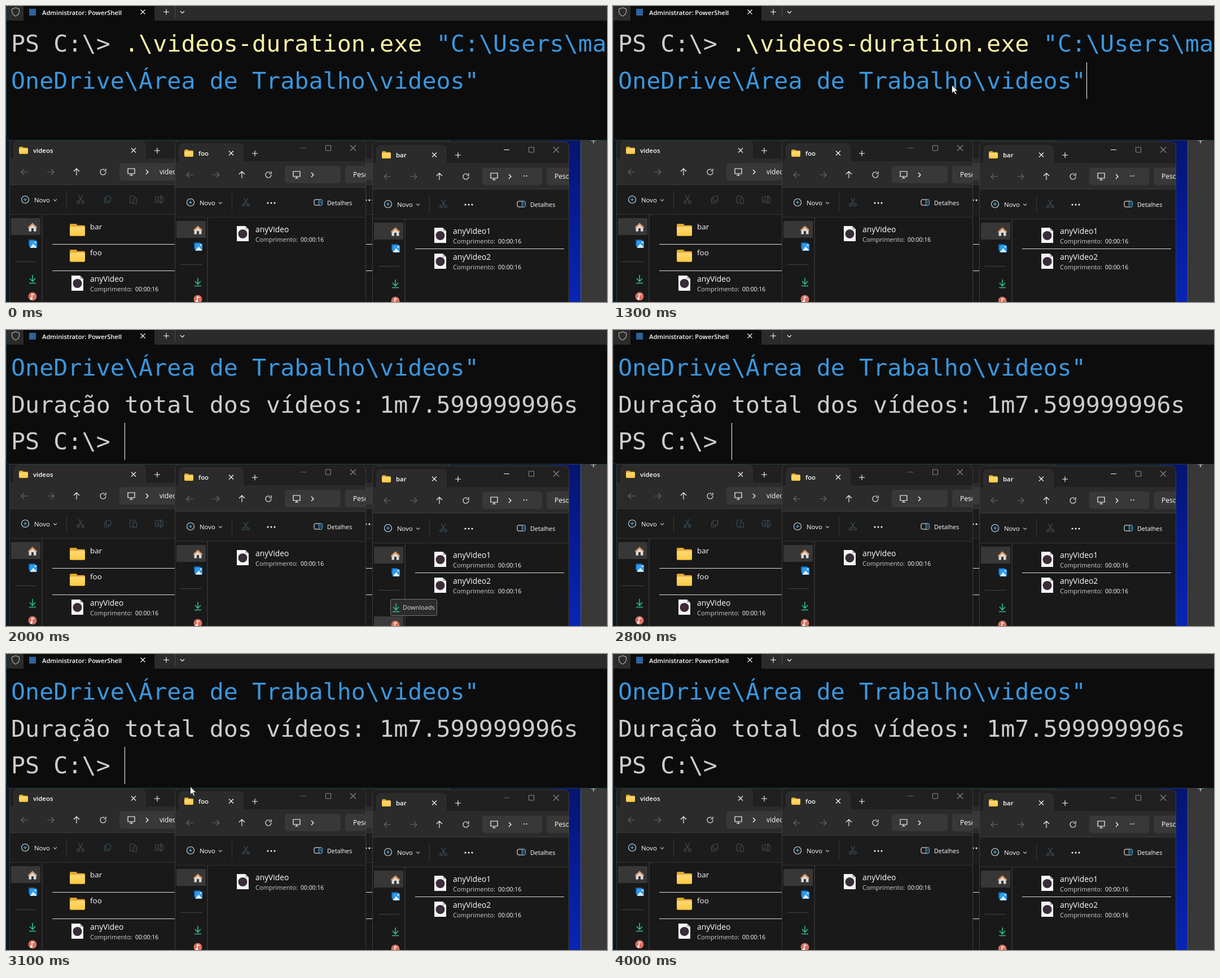
These frames come from a looping animation (1065 px wide and 526 px high, 4200 ms). An HTML page with a canvas:

```html
<!DOCTYPE html>
<html lang="pt">
<head>
<meta charset="utf-8">
<style>
html, body { margin: 0; width: 100%; height: 100%; overflow: hidden; background: #0c0c0c; }
canvas { display: block; }
</style>
</head>
<body>
<canvas id="stage" width="1065" height="526"></canvas>
<script>
const ctx = document.getElementById('stage').getContext('2d');
const LOOP = 4200;
const MONO = '"DejaVu Sans Mono", monospace';
const SANS = '"Open Sans", "Noto Sans", sans-serif';
const CELL = 25.12, ROW = 65.6;
const GREY = '#cccccc', YELLOW = '#f9f1a5', BLUE = '#3a96dd';
const WHITE = '#ffffff', DIM = '#6a6a6a', FADED = '#3f5563';

function rect(x, y, w, h, color) {
  ctx.fillStyle = color;
  ctx.fillRect(x, y, w, h);
}

function round(x, y, w, h, r, fill, stroke) {
  ctx.beginPath();
  ctx.roundRect(x, y, w, h, r);
  if (fill) { ctx.fillStyle = fill; ctx.fill(); }
  if (stroke) { ctx.strokeStyle = stroke; ctx.lineWidth = 1; ctx.stroke(); }
}

function disc(x, y, r, color) {
  ctx.beginPath();
  ctx.arc(x, y, r, 0, 7);
  ctx.fillStyle = color;
  ctx.fill();
}

function ring(x, y, r, color, from = 0, to = 7) {
  ctx.beginPath();
  ctx.arc(x, y, r, from, to);
  ctx.strokeStyle = color;
  ctx.lineWidth = 1.1;
  ctx.stroke();
}

function path(d, x, y, color, width = 1.1) {
  ctx.save();
  ctx.translate(x, y);
  const p = new Path2D(d);
  if (width) {
    ctx.strokeStyle = color;
    ctx.lineWidth = width;
    ctx.stroke(p);
  } else {
    ctx.fillStyle = color;
    ctx.fill(p);
  }
  ctx.restore();
}

function text(s, x, y, size, color = WHITE, weight = 400, family = SANS) {
  ctx.font = `${weight} ${size}px ${family}`;
  ctx.fillStyle = color;
  ctx.fillText(s, x, y);
}

const cross = (x, y, color, r = 4) => path(`M${-r} ${-r}L${r} ${r}M${r} ${-r}L${-r} ${r}`, x, y, color);
const plus = (x, y, color, r = 5) => path(`M${-r} 0H${r}M0 ${-r}V${r}`, x, y, color);
const chevDown = (x, y, color, r = 3) => path(`M${-r} ${-r / 2}L0 ${r / 2}L${r} ${-r / 2}`, x, y, color);
const chevRight = (x, y) => path('M-2 -4L2 0L-2 4', x, y, WHITE, 1.3);

function dots(x, y) {
  for (let i = -1; i < 2; i++) disc(x + i * 6, y, 1.5, WHITE);
}

function folder(x, y, w) {
  const h = w * 0.8;
  round(x, y, w * 0.48, h * 0.5, 2, '#e2a52b');
  round(x, y + h * 0.13, w, h * 0.87, 2, '#e9ad35');
  const g = ctx.createLinearGradient(0, y, 0, y + h);
  g.addColorStop(0, '#ffe08a');
  g.addColorStop(1, '#fcc93f');
  round(x, y + h * 0.26, w, h * 0.74, 2, g);
}

function videoFile(x, y, name) {
  path('M0 0H15L21 6V27H0Z', x, y, '#f6f6f6', 0);
  path('M15 0V6H21Z', x, y, '#bdbdbd', 0);
  disc(x + 10.5, y + 14, 8, '#3a2c38');
  text(name, x + 33, y + 11, 13.8);
  text('Comprimento:', x + 33, y + 28, 11.1, '#cfcfcf');
  text('00:00:16', x + 113, y + 28, 10.4);
}

function download(x, y) {
  path('M0 -7V4M-5 -1L0 4.5L5 -1M-6 7.5H6', x, y, '#2fbf95', 1.6);
}

function sidebar(hover) {
  rect(57, 138, 2, 200, '#2f2f2f');
  rect(3, 144, 52, 30, '#373737');
  path('M-8 0L0 -7.5L8 0L6.5 1.5V7.5H2V2H-2V7.5H-6.5V1.5Z', 41, 160, '#d9d9d9', 0);
  path('M-8 0L0 -7.5L8 0L6.5 1.5L0 -4.5L-6.5 1.5Z', 41, 160, '#e08a4b', 0);
  round(34, 182, 12, 12, 2, '#1266b4');
  round(36, 184, 13, 13, 2, '#2f9bea');
  path('M-6 6L0 -1L6 6Z', 42.5, 190.5, '#e6f4ff', 0);
  disc(46, 187, 1.3, WHITE);
  rect(10, 221, 38, 1, '#444');
  download(41, 252);
  if (hover) rect(3, 268, 52, 24, '#3b3b3b');
  disc(41, 283, 7.5, '#d9705f');
  path('M-1 4V-4L3 -3', 41, 283, '#fff', 1.5);
  disc(38.8, 287, 2, '#fff');
}

function scissors(x, y) {
  path('M-4 -7L3 4M4 -7L-3 4', x, y, FADED);
  ring(x - 4, y + 5.5, 2.2, FADED);
  ring(x + 4, y + 5.5, 2.2, FADED);
}

// Window chrome shared by the three file explorers, in local coordinates.
function explorer(o, body) {
  ctx.save();
  ctx.translate(o.x, o.y);
  ctx.beginPath();
  ctx.roundRect(0, 0, o.w, 320, 8);
  ctx.clip();
  rect(0, 0, o.w, 320, '#191919');
  rect(0, 0, o.w, 40, '#202020');
  round(8, 7, o.tab - 8, 40, 7, '#2b2b2b', '#343434');
  rect(0, 38, o.w, 46, '#2b2b2b');
  rect(0, 84, o.w, 54, '#1c1c1c');
  rect(0, 84, o.w, 1, '#393939');
  rect(0, 137, o.w, 1, '#343434');

  folder(17, 17, 16);
  text(o.title, 42, 28, 11.4, WHITE, 600);
  cross(o.tab - 21, 23.5, WHITE);
  plus(o.tab + 21, 24, WHITE);
  const c = o.w - 67;
  path('M-5 0H5', c - 44, 14.5, o.active ? WHITE : DIM);
  path('M-4.5 -4.5H4.5V4.5H-4.5Z', c, 14.5, '#8a8a8a', 1);
  cross(c + 44, 14.5, '#8a8a8a', 5);

  path('M-6 0H6M-1 -5L-6 0L-1 5', 27, 62, DIM);
  path('M-6 0H6M1 -5L6 0L1 5', 73, 62, DIM);
  path('M0 6V-6M-5 -1L0 -6L5 -1', 119, 62, WHITE);
  ring(166, 62, 5, WHITE, 0, 5.3);
  path('M5 -6V-2H1', 166, 62, WHITE);
  round(195, 46, o.bar, 31, 5, '#383838');
  path('M-6 -5H6V4H-6ZM-3 7H3M0 4V7', 216, 61, WHITE, 1.2);
  chevRight(244, 62);
  round(203 + o.bar, 46, 200, 31, 5, '#383838');
  text('Pesquisar', 217 + o.bar, 66, 12);

  ring(28, 111, 6.5, '#cfe6f5');
  plus(28, 111, '#4cc2ff', 3);
  text('Novo', 44, 116, 11.4);
  chevDown(81, 112, '#bbb');
  rect(101, 95, 1, 32, '#383838');
  scissors(126, 110);
  if (o.details) {
    dots(171, 112);
    const d = o.w - 85;
    round(d - 7, 106, 14, 10, 2, null, WHITE);
    round(d + 1.5, 106, 6, 10, 2, '#1c1c1c', '#4cc2ff');
    path('M3 3H6M3 6H6', d, 106, '#4cc2ff', 1);
    text('Detalhes', d + 16, 115.5, 10.8);
  }
  sidebar(o.hover);
  ctx.translate(-o.x, -o.y);
  body();
  ctx.restore();
  round(o.x + 0.5, o.y + 0.5, o.w - 1, 320, 8, null, '#3c3c3c');
}

function videosWindow() {
  explorer({ x: 6, y: 233, w: 780, tab: 241, bar: 350, title: 'videos' }, () => {
    text('videos', 272, 299, 12);
    round(174.5, 341, 8, 9, 1, null, FADED);
    round(177.5, 338, 8, 9, 1, '#1c1c1c', FADED);
    round(219.5, 338, 9, 12, 1, null, FADED);
    round(225.5, 342, 6, 9, 1, '#1c1c1c', FADED);
    round(264.5, 339, 14, 10, 2, null, FADED);
    text('A', 267, 348, 9, FADED);
    rect(274, 336, 1, 16, FADED);
    dots(644, 345);
    folder(113, 387, 27);
    text('bar', 149, 397, 13.5);
    rect(82, 423, 568, 1, '#e0e0e0');
    folder(113, 433, 27);
    text('foo', 149, 443, 13.5);
    rect(82, 470, 568, 1, '#e0e0e0');
    videoFile(116, 479, 'anyVideo');
  });
}

function fooWindow() {
  explorer({ x: 299, y: 238, w: 339, tab: 121, bar: 99, title: 'foo', details: true },
    () => videoFile(409, 391, 'anyVideo'));
}

function barWindow(t) {
  const hover = t >= 2000 && t < 2200;
  explorer({ x: 649, y: 241, w: 349, tab: 131, bar: 106, title: 'bar', details: true, active: t < 3000, hover }, () => {
    disc(918, 302, 1.1, WHITE);
    disc(922.5, 302, 1.1, WHITE);
    videoFile(759, 394, 'anyVideo1');
    rect(725, 431, 264, 1, '#e0e0e0');
    videoFile(759, 440, 'anyVideo2');
  });
  if (hover) {
    round(681.5, 478.5, 82, 29, 3, '#2c2c2c', '#777');
    download(691, 493);
    text('Downloads', 703, 497, 10.9, '#dcdcdc');
  }
}

function desktop() {
  rect(0, 230, 1065, 296, '#0a1824');
  const g = ctx.createLinearGradient(0, 239, 0, 526);
  g.addColorStop(0, '#05156f');
  g.addColorStop(0.5, '#061c98');
  g.addColorStop(1, '#0826b4');
  rect(970, 230, 48, 296, g);
  rect(1018, 230, 47, 296, '#383838');
  rect(1018, 230, 1, 296, '#5c5c5c');
  plus(1041, 239, WHITE);
}

function line(row, ...parts) {
  let col = 0;
  for (const [s, color] of parts) {
    text(s, 9 + col * CELL, 81 + row * ROW, 41.73, color, 400, MONO);
    col += s.length;
  }
}

function caret(t) {
  const between = (a, b) => t >= a && t < b;
  if (between(1200, 1600)) rect(839, 100, 1, 65, WHITE);
  if (between(1600, 2000)) rect(9, 165, 1, 66, WHITE);
  if (between(2000, 2300) || between(2800, 3300) || between(3900, 4000)) rect(210, 165, 1, 66, WHITE);
}

function terminal(t) {
  round(-0.5, -20, 1080, 258.5, [0, 0, 0, 8], '#0c0c0c', '#24404f');
  rect(0, 0, 1065, 26, '#2b2b2b');
  rect(31, 0, 232, 26, '#0c0c0c');
  rect(0, 0, 1, 232, '#24404f');
  path('M0 -7L6.5 -4.5V0C6.5 4 3 6.5 0 8C-3 6.5 -6.5 4 -6.5 0V-4.5Z', 17, 10, '#b5b5b5');
  rect(41, 5, 12, 12, '#2f629f');
  text('Administrator: PowerShell', 64, 16, 11.2, WHITE, 600);
  cross(242.5, 10.5, WHITE);
  plus(284, 10.5, WHITE);
  rect(299, 0, 1, 21, '#4a4a4a');
  chevDown(312.5, 11, WHITE, 3.5);

  const prompt = ['PS C:\\> ', GREY];
  const folderPath = ['OneDrive\\Área de Trabalho\\videos"', BLUE];
  if (t < 2000) {
    line(0, prompt, ['.\\videos-duration.exe ', YELLOW], ['"C:\\Users\\ma', BLUE]);
    line(1, folderPath);
  } else {
    line(0, folderPath);
    line(1, ['Duração total dos vídeos: 1m7.599999996s', GREY]);
    line(2, prompt);
  }
  caret(t);
}

// Pointer stops: time, x, y; a bare time hides it.
const stops = [
  [0], [400, 153, 33], [500, 250, 55], [600, 350, 82], [700, 435, 102], [800, 471, 110],
  [1100, 520, 122], [1200, 570, 134], [1300, 600, 140], [1600],
  [1900, 652, 251], [2000], [2200, 130, 508], [2300],
  [3000, 410, 411], [3100, 326, 235], [3200, 250, 140], [3300, 190, 75],
  [3400, 140, 28], [3500, 111, -1], [3600, 105, -8], [3700, 102, -16]
];

function pointer(t) {
  const [, x, y] = stops.findLast(s => s[0] <= t);
  if (x === undefined) return;
  const arrow = 'M0.5 0.5V15L4 11.8L6.3 17.2L8.6 16.2L6.3 11H10.8Z';
  path(arrow, x, y, '#fff', 0);
  path(arrow, x, y, '#111', 0.8);
}

function draw() {
  const t = performance.now() % LOOP;
  desktop();
  videosWindow();
  fooWindow();
  barWindow(t);
  terminal(t);
  pointer(t);
  requestAnimationFrame(draw);
}
draw();
</script>
</body>
</html>
```
